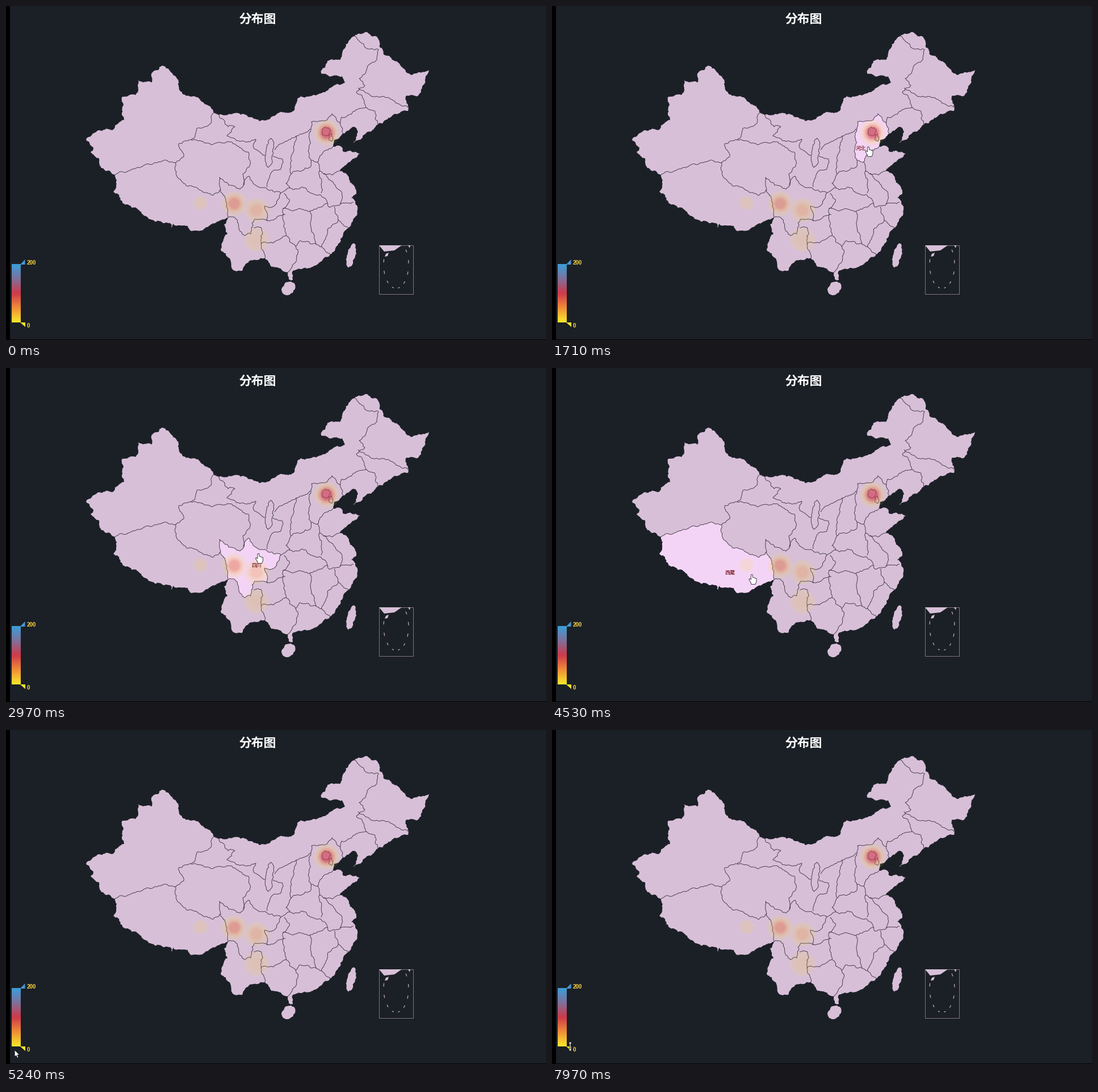
Recreate the animation shown at these times as a matplotlib script. Size 951 by 589 pixels, loop 8 s.

```python
import numpy as np
import matplotlib.pyplot as plt
from matplotlib.animation import FuncAnimation
from matplotlib.collections import LineCollection
from matplotlib.colors import LinearSegmentedColormap
from matplotlib.patches import Polygon, Rectangle

W, H = 951, 589
STEP, LOOP = 40, 8000
BACK, LAND, LIT, INK = "#1b2026", "#d8bfd8", "#f4d4f6", "#2b2630"
rng = np.random.default_rng(11)


def split(a, b):
    """Fractal line from a to b (b left out); the swing is capped on long stretches."""
    d = b - a
    size = np.hypot(*d)
    if size < 3.5:
        return [a]
    swing = rng.uniform(-0.2, 0.2) * min(1, 13 / size)
    mid = (a + b) / 2 + np.array([-d[1], d[0]]) * swing
    return split(a, mid) + split(mid, b)


def rough(*pts):
    pts = np.array(pts, float)
    out = []
    for a, b in zip(pts[:-1], pts[1:]):
        out += split(a, b)
    return np.array(out + [pts[-1]])


def ring(x, y, rx, ry, tilt=0, n=12):
    a = np.linspace(0, 2 * np.pi, n + 1)
    c, s = np.cos(tilt), np.sin(tilt)
    u, v = rx * np.cos(a), ry * np.sin(a)
    return rough(*zip(x + c * u - s * v, y + s * u + c * v))


def join(*chains):
    return np.vstack(chains)


# Outer edge, clockwise, by its main corners
west = rough((192, 298), (183, 291), (165, 281), (164, 269), (149, 258), (154, 250),
             (141, 236), (161, 220), (190, 217), (208, 201), (205, 160), (228, 157),
             (233, 131), (256, 135), (258, 117), (275, 105), (301, 128), (311, 155),
             (338, 161), (366, 188))
north = rough((366, 188), (420, 191), (447, 203), (503, 187), (519, 159), (549, 156),
              (597, 135), (592, 124), (555, 119), (566, 97), (588, 95), (605, 60),
              (633, 46), (655, 57), (665, 85), (691, 100), (712, 121), (745, 113),
              (733, 145), (726, 158), (706, 158), (708, 185), (684, 190), (655, 209))
gulf = rough((655, 209), (628, 232), (611, 241), (620, 222), (612, 213), (594, 225))
bay = rough((594, 225), (578, 236), (576, 248))
cape = rough((576, 248), (589, 247), (594, 257), (623, 260), (600, 279), (588, 291))
east = rough((588, 291), (601, 298), (617, 331), (608, 338), (619, 354), (604, 391),
             (578, 433), (537, 461), (504, 469), (505, 483), (498, 482), (497, 469),
             (468, 460), (456, 445))
south = rough((456, 445), (428, 450), (416, 467), (403, 467), (394, 445), (378, 430),
              (390, 402), (384, 386), (391, 373))
high = rough((391, 373), (372, 380), (343, 396), (327, 397), (320, 388), (294, 384),
             (292, 391), (289, 383), (262, 380), (238, 363), (206, 348), (189, 328),
             (194, 316), (192, 298))

# Borders of the regions that light up
xj_tb = rough((192, 298), (222, 288), (278, 272), (299, 276))
tb_qh = rough((299, 276), (300, 298), (320, 318), (364, 334), (378, 324))
tb_sc = rough((378, 324), (389, 350), (391, 373))
sc_north = rough((378, 324), (376, 302), (392, 316), (412, 323), (428, 300), (443, 318),
                 (484, 330))
sc_east = rough((484, 330), (472, 353), (455, 353), (460, 379))
sc_south = rough((460, 379), (438, 376), (431, 402), (420, 405), (403, 373), (391, 373))
sx_west = rough((511, 229), (506, 250), (502, 296))
sx_south = rough((502, 296), (536, 284), (537, 272))
hb_sx = rough((537, 272), (534, 250), (537, 217))
sx_north = rough((537, 217), (511, 229))
hb_north = rough((537, 217), (538, 204), (566, 200), (574, 190), (589, 206))
hb_east = rough((589, 206), (594, 225))
hb_sd = rough((576, 248), (553, 264), (549, 275))
hb_south = rough((549, 275), (537, 272))
sd_south = rough((549, 275), (552, 291), (575, 298), (588, 291))
capital = ring(563.5, 221, 7.5, 8, n=7)
harbour = ring(572, 232, 4, 7, n=5)

inner = [
    xj_tb, tb_qh, tb_sc, sc_north, sc_east, sc_south, sx_west, sx_south, hb_sx, sx_north,
    hb_north, hb_east, hb_sd, hb_south, sd_south, capital, harbour,
    # north-west
    rough((299, 276), (313, 266), (304, 243), (326, 236), (336, 216), (356, 211), (366, 188)),
    rough((326, 236), (366, 243), (390, 239), (427, 258), (430, 274), (417, 296), (418, 316)),
    rough((366, 188), (391, 213), (403, 213), (389, 229), (412, 239), (440, 235), (435, 247),
          (456, 264)),
    ring(464, 259, 7, 26, 0.1),
    rough((470, 264), (487, 270), (484, 288), (467, 294), (460, 319)),
    rough((473, 254), (490, 240), (511, 229)),
    # north-east
    rough((589, 206), (591, 196), (634, 179), (627, 158), (617, 152), (632, 140), (622, 128),
          (653, 95), (656, 77), (640, 76), (612, 50)),
    rough((634, 179), (650, 186), (655, 209)),
    rough((620, 144), (640, 156), (666, 160), (708, 179)),
    # centre and south
    rough((502, 296), (493, 313), (500, 321), (484, 330)),
    rough((500, 321), (528, 321), (560, 338), (570, 355), (612, 346)),
    rough((552, 291), (556, 306), (555, 330)),
    rough((560, 295), (580, 316), (592, 332), (588, 349)),
    rough((490, 330), (499, 341), (488, 357), (535, 362), (566, 348)),
    rough((578, 354), (585, 377), (604, 391)),
    rough((585, 377), (566, 394), (556, 425)),
    rough((535, 362), (537, 390), (546, 420)),
    rough((510, 424), (519, 414), (546, 420), (572, 440)),
    rough((510, 424), (514, 437), (497, 469)),
    rough((488, 357), (493, 405), (510, 424)),
    rough((460, 379), (492, 368)),
    rough((436, 391), (450, 392), (449, 420), (456, 445)),
    rough((449, 420), (478, 413), (493, 405)),
]
outer = join(west, north, gulf, bay, cape, east, south, high)
islands = [ring(497.5, 498, 13.5, 10.5, -0.8), ring(608, 440, 22, 7, 1.8)]
regions = {
    "山东": (join(cape, sd_south[::-1], hb_sd[::-1]), 577, 271),
    "河北": (join(hb_north, hb_east, bay, hb_sd, hb_south, hb_sx), 544, 250),
    "山西": (join(sx_west, sx_south, hb_sx, sx_north), 520, 257),
    "四川": (join(sc_north, sc_east, sc_south, tb_sc[::-1]), 441, 347),
    "西藏": (join(xj_tb, tb_qh, tb_sc, high), 313, 360),
}

# 72 dpi makes one point one pixel
fig = plt.figure(figsize=((W + 0.01) / 72, (H + 0.01) / 72), dpi=72, facecolor=BACK)
ax = fig.add_axes([0, 0, 1, 1])


def area(pts, color=LAND, z=1, lw=0, **kw):
    return ax.add_patch(Polygon(pts, facecolor=color, zorder=z, lw=lw, **kw))


def text(x, y, s, size, color, font="Liberation Sans", **kw):
    return ax.text(x, y, s, fontsize=size, color=color, family=font, va="center_baseline",
                   zorder=6, **kw)


def strip(img, box, z):
    ax.imshow(img, extent=box, aspect="auto", interpolation="nearest", zorder=z)


ax.add_patch(Rectangle((0, 0), 7, H, color="black", lw=0))
ax.add_patch(Rectangle((0, H - 1), W, 1, color="black", lw=0))
for pts in [outer] + islands:
    area(pts)
for pts in (capital, harbour):
    area(pts, z=3)
ax.add_collection(LineCollection(inner, colors=INK, linewidths=0.8, zorder=4))

lit = {}
for name, (pts, x, y) in regions.items():
    lit[name] = (area(pts, LIT, 2),
                 text(x, y, name, 9, (100 / 255, 0, 0), "Noto Sans CJK JP", ha="center"))

# Inset of the southern sea, with dashes along a bowl
ax.add_patch(Rectangle((657, 422), 59.5, 86.5, fill=False, ec="#8a8085", lw=0.9))
area([(657, 422), (697, 422), (684, 431), (666, 433)])
area([(708, 422), (712, 422), (711, 427)])
area([(667, 442), (669, 437), (674, 435), (672, 441)])
turn = np.radians(np.arange(-35, 200, 28)[:, None] + [-4, 4])
bowl = np.dstack([687 + 22 * np.cos(turn), 456 + 42 * np.sin(turn)])
ax.add_collection(LineCollection(bowl, colors=LAND, linewidths=1.1))

# Heat spots: x, y, radius, strength
ramp = LinearSegmentedColormap.from_list(
    "heat", ["#fae42a", "#f08c37", "#cf3a4b", "#80709a", "#3e9bd7"])
spots = [(563.5, 224.5, 24, 0.5), (402, 348.5, 23, 0.33), (441, 360, 22.5, 0.2),
         (441, 412, 22.5, 0.08), (342.5, 347.5, 13.5, 0.04)]
gx, gy = np.meshgrid(np.arange(325, 592) + 0.5, np.arange(195, 440) + 0.5)
value, cover = np.zeros_like(gx), np.zeros_like(gx)
for x, y, r, s in spots:
    d = np.hypot(gx - x, gy - y)
    value += s * np.clip(2.2 * (0.8 - d / r), 0, 1)
    cover = np.maximum(cover, np.clip((r - d) / 2, 0, 1))
heat = ramp(value)
heat[..., 3] = cover * (0.12 + 0.98 * value)
strip(heat, (325, 592, 440, 195), 5)

# Colour scale
strip(ramp(np.linspace(1, 0, 34))[:, None], (10, 25, 558, 456), 2)
area([(25, 456), (33.5, 447), (33.5, 456)], "#4a97cf", 3)
area([(25, 558), (33.5, 558), (33.5, 566.5)], "#fae42a", 3)
text(37, 452, "200", 9.8, "#fad23c", weight="bold")
text(37, 562.5, "0", 9.8, "#fad23c", weight="bold")
text(443, 21, "分布图", 21.8, "white", "Noto Sans CJK JP", weight="bold", ha="center")
hint = [text(32, 555.5, "< 14", 9.8, "#f4e41f", weight="bold"),
        area([(25, 551), (29, 555.5), (25, 555.5)], "#fae42a", 4),
        area([(15.5, 549), (18.5, 547), (21.5, 549), (18.5, 551)], "#c98a2c", 4)]

# Pointers, relative to their hot spots
arm = np.array([(1, -1), (1, -7), (3.5, -7), (0, -11), (-3.5, -7), (-1, -7), (-1, -1)])
quarter = np.array([(0, 1), (-1, 0)])
head = np.array([(1, 0), (1, -5), (3.5, -5), (0, -8.5), (-3.5, -5), (-1, -5), (-1, 0)])
shapes = {
    "arrow": np.array([(0, 0), (0, 12), (2.8, 9.6), (4.8, 14), (6.8, 13.1), (4.9, 8.8),
                       (8.6, 8.6)]),
    "hand": np.array([(0, 0), (-1.5, 1), (-1.5, 9), (-4, 7.4), (-5, 9), (-2, 14), (-1, 17.5),
                      (6, 17.5), (8, 13), (8, 7.3), (1.5, 5), (1.5, 1)]),
    "size": np.vstack([head, -head]),
    "move": np.vstack([arm @ np.linalg.matrix_power(quarter, k) for k in range(4)]),
}
pointer = area(shapes["arrow"], "white", 9, 0.8, ec="#15151a", joinstyle="round")

steps = [(0, None, 0, 0, None)]  # time, pointer, x, y, lit region


def glide(t0, t1, n, start, end, kind, name=None, late=None):
    """n even steps slowing into the end; `late` = (index, kind, name) switches midway."""
    for i, u in enumerate(np.linspace(0, 1, n)):
        if late and i == late[0]:
            kind, name = late[1:]
        p = np.array(start) + np.subtract(end, start) * (1 - (1 - u) ** 1.6)
        steps.append((t0 + u * (t1 - t0), kind, *p, name))


glide(310, 550, 4, (738, 515), (592, 272), "arrow", None, (3, "hand", "山东"))
glide(700, 1010, 5, (586, 268), (557, 248), "hand", "山东", (1, "hand", "河北"))
glide(1710, 2100, 6, (557, 248), (522, 264), "hand", "河北", (3, "hand", "山西"))
glide(2730, 2970, 4, (500, 288), (444.5, 327), "hand", None, (1, "hand", "四川"))
glide(4530, 4600, 2, (352, 364), (300.5, 405.5), "hand", "西藏", (1, "arrow", "西藏"))
glide(4690, 4920, 4, (225, 455), (10, 574), "arrow")
glide(5070, 5380, 5, (13, 568), (16.2, 562.5), "arrow")
glide(5550, 5700, 3, (16, 558), (17, 548), "arrow")
glide(6080, 6470, 6, (18, 551), (18.5, 529.5), "size")
glide(6700, 7430, 10, (19, 532), (32, 558), "size")
steps += [(7650, "move", 30, 508, None), (7800, None, 0, 0, None),
          (7970, "size", 32, 558, None)]


def draw(i):
    t = i * STEP + 30
    _, kind, x, y, name = [s for s in steps if s[0] <= t + 0.01][-1]
    pointer.set_visible(kind is not None)
    if kind:
        pointer.set_xy(shapes[kind] + (x, y))
    for key, parts in lit.items():
        for part in parts:
            part.set_visible(key == name)
    for part in hint:
        part.set_visible(5700 <= t < 6860)
    return []


ax.set_xlim(0, W)
ax.set_ylim(H, 0)
ax.axis("off")
anim = FuncAnimation(fig, draw, frames=LOOP // STEP, interval=STEP, repeat=True,
                     repeat_delay=0, blit=False)
plt.show()
```
